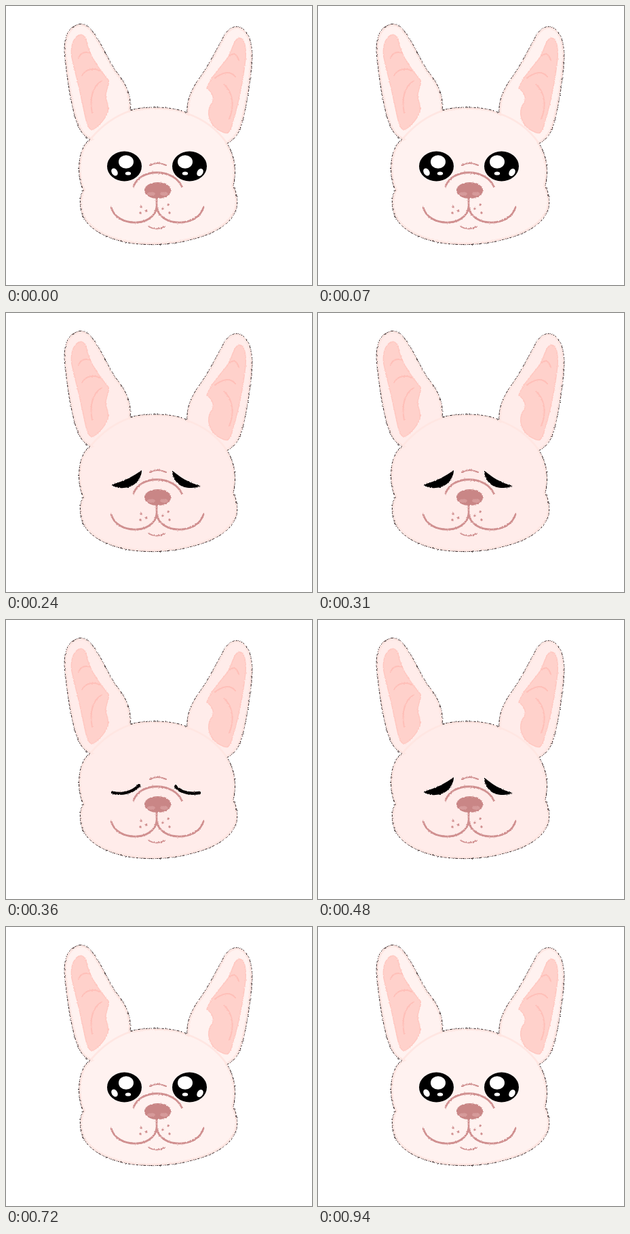
These frames come from a looping animation (451 by 410 pixels, 1080 ms). An HTML page without scripts:

```html
<!DOCTYPE html>
<html lang="en">
<head>
<meta charset="utf-8">
<title>Blinking pup</title>
<style>
  html, body { margin: 0; width: 100%; height: 100%; overflow: hidden; background: #fff; }
  svg { display: block; width: 100%; height: 100%; }
  .line { fill: none; stroke: #d09090; stroke-width: 2.8; stroke-linecap: round; }
  .fold { fill: none; stroke: #ffbfb8; stroke-width: 2; stroke-linecap: round; }
  .inner { fill: #ffd1cb; stroke: #ffc8c1; stroke-width: 1.5; }
  .shine { fill: #fff; }
  .lash { fill: none; stroke: #080606; stroke-width: 4.4; stroke-linecap: round; }

  /* The coat is a shade deeper while the eyes are nearly shut */
  .coat { fill: #fff2f0; animation: coat 1080ms step-end infinite; }
  @keyframes coat {
    0%, 55.556%, 100% { fill: #fff2f0; }
    22.222% { fill: #ffecea; }
  }

  /* The blink: open, half, narrow, closed and back, in hard steps */
  .pose { visibility: hidden; animation: 1080ms step-end infinite; }
  .open { animation-name: open; }
  .half { animation-name: half; }
  .narrow { animation-name: narrow; }
  .closed { animation-name: closed; }
  @keyframes open {
    0%, 66.667%, 100% { visibility: visible; }
    11.111% { visibility: hidden; }
  }
  @keyframes half {
    0%, 22.222%, 66.667%, 100% { visibility: hidden; }
    11.111%, 55.556% { visibility: visible; }
  }
  @keyframes narrow {
    0%, 33.333%, 55.556%, 100% { visibility: hidden; }
    22.222%, 44.444% { visibility: visible; }
  }
  @keyframes closed {
    0%, 44.444%, 100% { visibility: hidden; }
    33.333% { visibility: visible; }
  }
</style>
</head>
<body>
<svg viewBox="0 0 451 410" preserveAspectRatio="none">
  <defs>
    <filter id="rough" filterUnits="userSpaceOnUse" x="0" y="0" width="451" height="410" color-interpolation-filters="sRGB">
      <feTurbulence type="fractalNoise" baseFrequency=".45" numOctaves="2" seed="4"/>
      <feDisplacementMap in="SourceGraphic" scale="2.6" xChannelSelector="R" yChannelSelector="G"/>
    </filter>
    <path id="body" d="M183 153C205 147 246 147 267 157C266 140 272 126 282 110C296 92 308 68 320 46C326 34 336 28 345 31C358 37 363 55 363 75C361 105 356 140 349 168C345 185 338 196 326 202C336 218 341 242 335 264C342 278 343 295 336 306C322 330 290 340 262 346C235 352 200 352 175 347C145 340 122 328 113 308C107 293 109 278 114 270C106 255 106 230 111 215C115 204 119 199 124 196C110 190 103 172 98 148C92 120 88 90 86 66C86 48 90 33 104 28C112 24 122 28 128 38C139 52 148 73 160 93C172 108 186 127 183 153Z"/>
    <clipPath id="inside"><use href="#body"/></clipPath>
    <path id="lidL" d="M149 239C165 242 188 235 200 228C201 245 192 258 176 258C160 258 150 250 149 239Z"/>
    <path id="lidR" d="M245 227C258 236 278 241 296 239C294 252 284 258 270 258C252 257 245 245 245 227Z"/>
    <clipPath id="lids"><use href="#lidL"/><use href="#lidR"/></clipPath>
    <g id="glints" class="shine">
      <ellipse cx="160" cy="244" rx="4.2" ry="6" transform="rotate(-32 160 244)"/>
      <ellipse cx="180" cy="246" rx="4.2" ry="2.6"/>
      <ellipse cx="264" cy="246" rx="4.2" ry="2.6"/>
      <ellipse cx="286" cy="244.500" rx="4.2" ry="6" transform="rotate(32 286 244.500)"/>
    </g>
  </defs>

  <g filter="url(#rough)">
    <use href="#body" class="coat"/>
    <use href="#body" clip-path="url(#inside)" fill="none" stroke="#ffe6e2" stroke-width="6"/>
    <use href="#body" fill="none" stroke="#2f2324" stroke-dasharray="4 1.5 2 1 1 2"/>
  </g>

  <g fill="none" stroke="#ffe6e2" stroke-width="2.6">
    <path d="M125 195C140 177 160 162 183 154"/>
    <path d="M267 158C290 166 311 181 325 201"/>
  </g>

  <g filter="url(#rough)">
    <path class="inner" d="M107 43C114 40 118 46 120 58C126 78 138 94 151 109C153 116 147 122 147 132C147 140 152 144 150 156C145 168 134 180 126 182C118 178 117 160 112 140C108 118 101 95 97 75C95 62 98 48 107 43Z"/>
    <path class="inner" d="M344 47C352 48 354 62 353 78C350 105 344 135 338 158C333 172 332 185 325 187C314 184 304 178 300 165C297 155 299 148 304 142C308 134 303 126 296 121C301 105 315 92 327 76C334 64 336 48 344 47Z"/>
    <g class="fold">
      <path d="M107 76Q112 65 124 69"/>
      <path d="M112 102C118 92 130 91 138 95"/>
      <path d="M127 157C123 138 127 118 141 110"/>
      <path d="M330 73Q338 66 343 79"/>
      <path d="M308 106C318 98 330 94 338 104"/>
      <path d="M321 115C335 127 337 148 329 166"/>
    </g>
  </g>

  <g filter="url(#rough)">
    <g class="line">
      <path d="M188 265C198 238 246 238 259 265"/>
      <path d="M212 234Q223 228 236 234" stroke-width="2"/>
      <path d="M222 282V297"/>
      <path d="M155 296C163 325 217 326 222 296C228 326 283 325 291 296"/>
      <path d="M210 324Q222 331 234 324" stroke-width="2"/>
    </g>
    <ellipse cx="223.5" cy="271" rx="19.5" ry="12" fill="#c98686"/>
    <g fill="#d69a9a">
      <ellipse cx="214" cy="276" rx="6" ry="2.8"/>
      <ellipse cx="233" cy="276" rx="6" ry="2.8"/>
    </g>
    <path d="M199 295h0M198 304h0M207 301h0M239 292h0M231 298h0M241 304h0" stroke="#d09090" stroke-width="3.4" stroke-linecap="round"/>
  </g>

  <g class="pose open">
    <ellipse cx="174.500" cy="235.500" rx="25.5" ry="22"/>
    <ellipse cx="270.500" cy="235.500" rx="25.5" ry="22"/>
    <ellipse class="shine" cx="177" cy="229" rx="11" ry="9.8"/>
    <ellipse class="shine" cx="264" cy="229" rx="11" ry="9.8"/>
    <use href="#glints"/>
  </g>
  <g class="pose half">
    <use href="#lidL"/>
    <use href="#lidR"/>
    <use href="#glints" clip-path="url(#lids)"/>
  </g>
  <g class="pose narrow" filter="url(#rough)">
    <path d="M156 252C172 248 188 240 200 231C200 245 188 257 173 257C165 258 158 255 156 252Z"/>
    <path d="M245 231C254 240 270 250 287 254C280 258 262 259 254 251C247 245 245 238 245 231Z"/>
  </g>
  <g class="pose closed" filter="url(#rough)">
    <path class="lash" d="M157 253.500C170 257 186 254 196 243"/>
    <path class="lash" d="M250 245C257 253 270 256 285 254"/>
  </g>
</svg>
</body>
</html>
```
